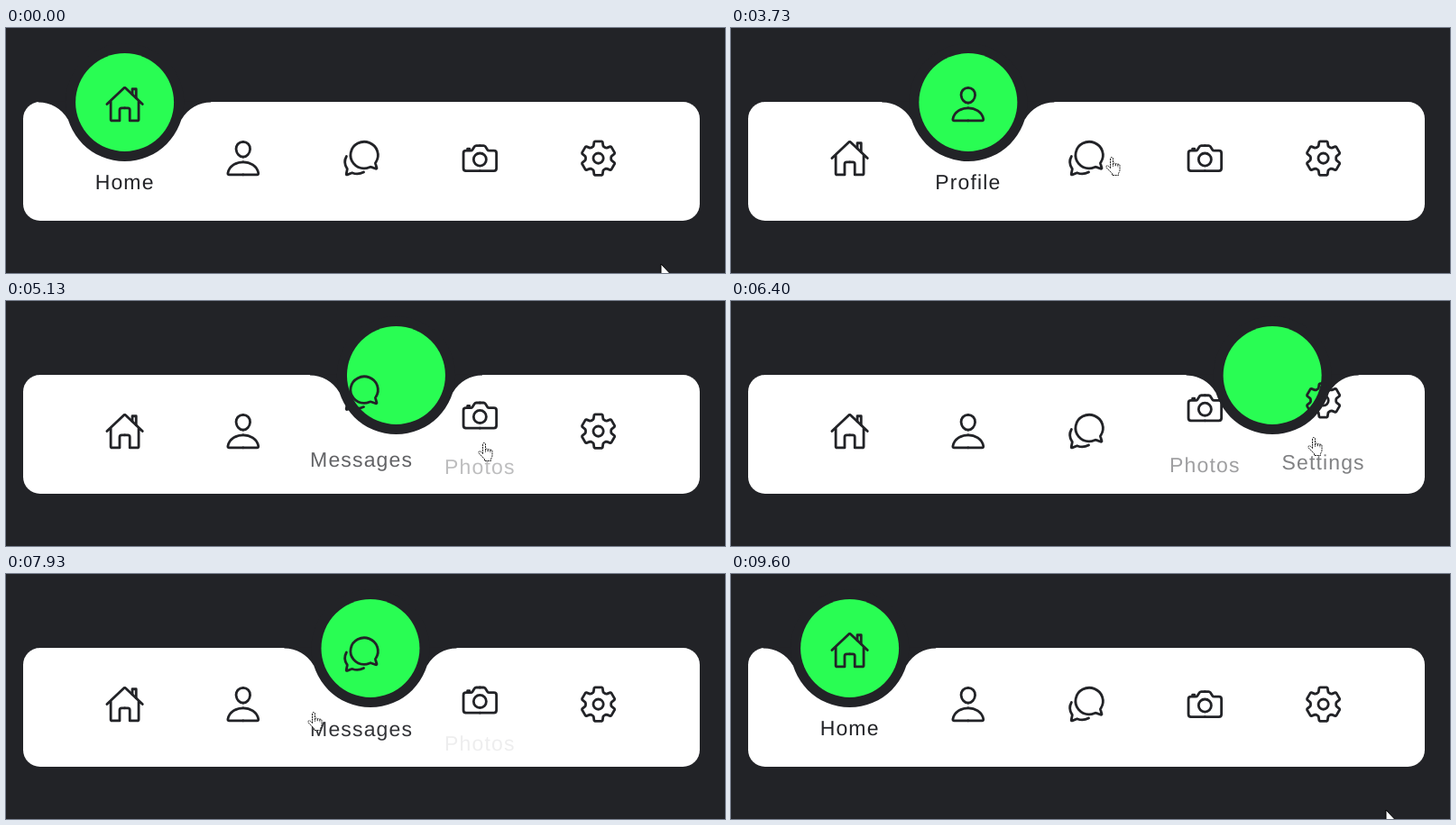
Write an HTML page that moves like this. It is 797 by 272 pixels and loops after 9870 ms.

```html
<!DOCTYPE html>
<html lang="en">
<head>
<meta charset="utf-8">
<title>Navigation menu</title>
<style>
  html, body { margin: 0; width: 100%; height: 100%; overflow: hidden; background: #222327; }
  svg { display: block; width: 797px; height: 272px; }
  .icon { fill: none; stroke: #222327; stroke-width: 32; stroke-linecap: round; stroke-linejoin: round; }
  text {
    font: 23px "Liberation Sans", Arial, sans-serif; letter-spacing: .05em;
    text-anchor: middle; text-rendering: geometricPrecision; fill: #222327;
  }
  .cursor { fill: #fff; stroke: #000; stroke-linejoin: round; }
  #hand { stroke-width: .9; stroke-dasharray: 2 .8; }
</style>
</head>
<body>
<svg viewBox="0 0 797 272">
  <rect x="19" y="82" width="750" height="132" rx="18.75" fill="#fff"/>
  <g id="indicator">
    <g fill="#222327">
      <path id="flare" d="M-95.6 -1V0A37.5 37.5 0 0 1 -63.1 18.75H-56.25V-1Z"/>
      <use href="#flare" transform="scale(-1 1)"/>
      <circle r="65.6"/>
    </g>
    <circle r="54.5" fill="#29fd53"/>
  </g>
  <g id="items"></g>
  <g id="hand" class="cursor">
    <path d="M5.5 12.5V2a1.5 1.5 0 0 1 3 0V7.5q1.5-1 2.7.3q1.5-.8 2.6.5q2-.5 2.2 1.5v4.5q0 2-1.5 4V20.5H7.5V18.5L1 11.8q-.5-2 1.5-2q1.2.4 3 2.7z"/>
    <path d="M8.5 7.5v3.5M11.2 8v3M13.8 8.5v3" fill="none"/>
  </g>
  <path id="arrow" class="cursor" d="M0 0V16.5L3.8 13L6.3 18.8L8.8 17.7L6.3 12H11.5Z"/>
</svg>
<script>
const LOOP = 9870, TICK = 200 / 3, DURATION = 500, TRIP = 400;
const ICON_Y = 144.6, LABEL_Y = 179;
const itemX = i => 131.6 + 131.25 * i;
const $ = id => document.getElementById(id);
const place = (el, x, y) => el.setAttribute('transform', `translate(${x} ${y})`);

const ring = (y, r) => `M${256 - r} ${y}a${r} ${r} 0 1 0 ${2 * r} 0a${r} ${r} 0 1 0 ${-2 * r} 0z`;

// Half a cog tooth as angle and radius, mirrored and turned six times
function cog() {
  const half = [[25.5, 161], [21, 168], [14.6, 211], [11, 217]];
  const tooth = [...half.map(([a, r]) => [-a, r]), ...half.reverse()];
  const points = [];
  for (let turn = 0; turn < 360; turn += 60) {
    for (const [a, r] of tooth) {
      const angle = (a + turn) * Math.PI / 180;
      points.push(`${256 + r * Math.sin(angle)} ${256 - r * Math.cos(angle)}`);
    }
  }
  return `M${points.join('L')}Z`;
}

// Icons on a 512 grid: the left half is mirrored, the rest is drawn once
const menu = [
  { name: 'Home',
    half: 'M80 212V448q0 16 16 16h96V328q0-24 24-24h40M32 256L245 52q4-4 11-4',
    rest: 'M400 179V64h-48v69' },
  { name: 'Profile',
    half: 'M256 48c-52 0-92 41-88 96 4 53 44 96 88 96M256 304c-87 0-175 48-192 139-2 11 4 21 16 21h176' },
  { name: 'Messages',
    rest: 'M431 321q-2-8 6-16A173 168 0 1 0 287 384q34 0 73-16 10-4 19 0l57 20q12 3 12-8z' +
      'M66 232a146 146 0 0 0 7 153q4 5 3 8l-12 62q-1 12 11 9l56-22q6-2 12 0 68 26 141-10' },
  { name: 'Photos',
    half: 'M256 96h-46q-14 0-22 11l-27 42q-7 11-21 11H80q-32 0-32 32v192q0 32 32 32h176',
    rest: 'M124 158v-22h-24v22' + ring(272, 80) },
  { name: 'Settings', rest: cog() + ring(256, 64) }
];

// Clicks: time, chosen item
const clicks = [[2765, 1], [4035, 2], [5034, 3], [6235, 4], [7065, 3], [7600, 2], [8297, 1], [9100, 0]];

// Pointer stops: time of arrival, x, y
const stops = [
  [2730, 255, 146], [3330, 415, 143], [4930, 523, 157], [5600, 687, 151], [6650, 535, 151],
  [7333, 412, 140], [8133, 256, 166], [8600, 100, 148], [9450, 140, 290]
];
const REST = [726, 262], REST_FROM = 9580;

function add(parent, tag, attrs = {}) {
  const el = parent.appendChild(document.createElementNS('http://www.w3.org/2000/svg', tag));
  for (const key in attrs) el.setAttribute(key, attrs[key]);
  return el;
}
const items = menu.map(({ name, half = '', rest = '' }) => {
  const icon = add($('items'), 'g');
  const grid = add(icon, 'g', { class: 'icon', transform: 'scale(.0879) translate(-256 -256)' });
  add(grid, 'path', { d: half + rest });
  add(grid, 'path', { d: half, transform: 'translate(512 0) scale(-1 1)' });
  const label = add($('items'), 'text');
  label.textContent = name;
  return { icon, label };
});

// cubic-bezier(.25, .1, .25, 1)
function ease(x) {
  if (x <= 0 || x >= 1) return x <= 0 ? 0 : 1;
  const curve = (s, a, b) => 3 * a * s * (1 - s) ** 2 + 3 * b * s * s * (1 - s) + s ** 3;
  let lo = 0, hi = 1;
  for (let i = 0; i < 24; i++) {
    const mid = (lo + hi) / 2;
    if (curve(mid, .25, .25) < x) lo = mid; else hi = mid;
  }
  return curve(lo, .1, 1);
}
const smooth = k => k * k * (3 - 2 * k);
const mix = (a, b, k) => a + (b - a) * k;

function drawMenu(t) {
  let from = 0, to = 0, p = 1;
  for (const [start, item] of clicks) {
    if (t < start) break;
    from = to;
    to = item;
    p = ease((t - start) / DURATION);
  }
  place($('indicator'), itemX(mix(from, to, p)), 82.5);
  items.forEach(({ icon, label }, i) => {
    const active = i === to ? p : i === from ? 1 - p : 0;
    place(icon, itemX(i), ICON_Y - 60 * active);
    place(label, itemX(i), LABEL_Y + 18.75 * (1 - active));
    label.setAttribute('opacity', active);
  });
}

function pointerAt(t) {
  if (t < stops[0][0] || t > REST_FROM) return REST;
  let [, x, y] = stops[0];
  for (const [arrive, nextX, nextY] of stops.slice(1)) {
    const k = smooth(Math.min(1, Math.max(0, (t - arrive) / TRIP + 1)));
    x = mix(x, nextX, k);
    y = mix(y, nextY, k);
  }
  return [Math.round(x), Math.round(y)];
}

function drawPointer(t) {
  const [x, y] = pointerAt(t);
  const over = y < 212;
  $('hand').style.display = over ? '' : 'none';
  $('arrow').style.display = over ? 'none' : '';
  place(over ? $('hand') : $('arrow'), x, y);
}

// The picture advances fifteen times a second
const began = performance.now();
function draw() {
  const now = (performance.now() - began) % LOOP;
  const t = Math.floor((now + 3.4) / TICK) * TICK;
  drawMenu(t);
  drawPointer(t);
  requestAnimationFrame(draw);
}
draw();
</script>
</body>
</html>
```
